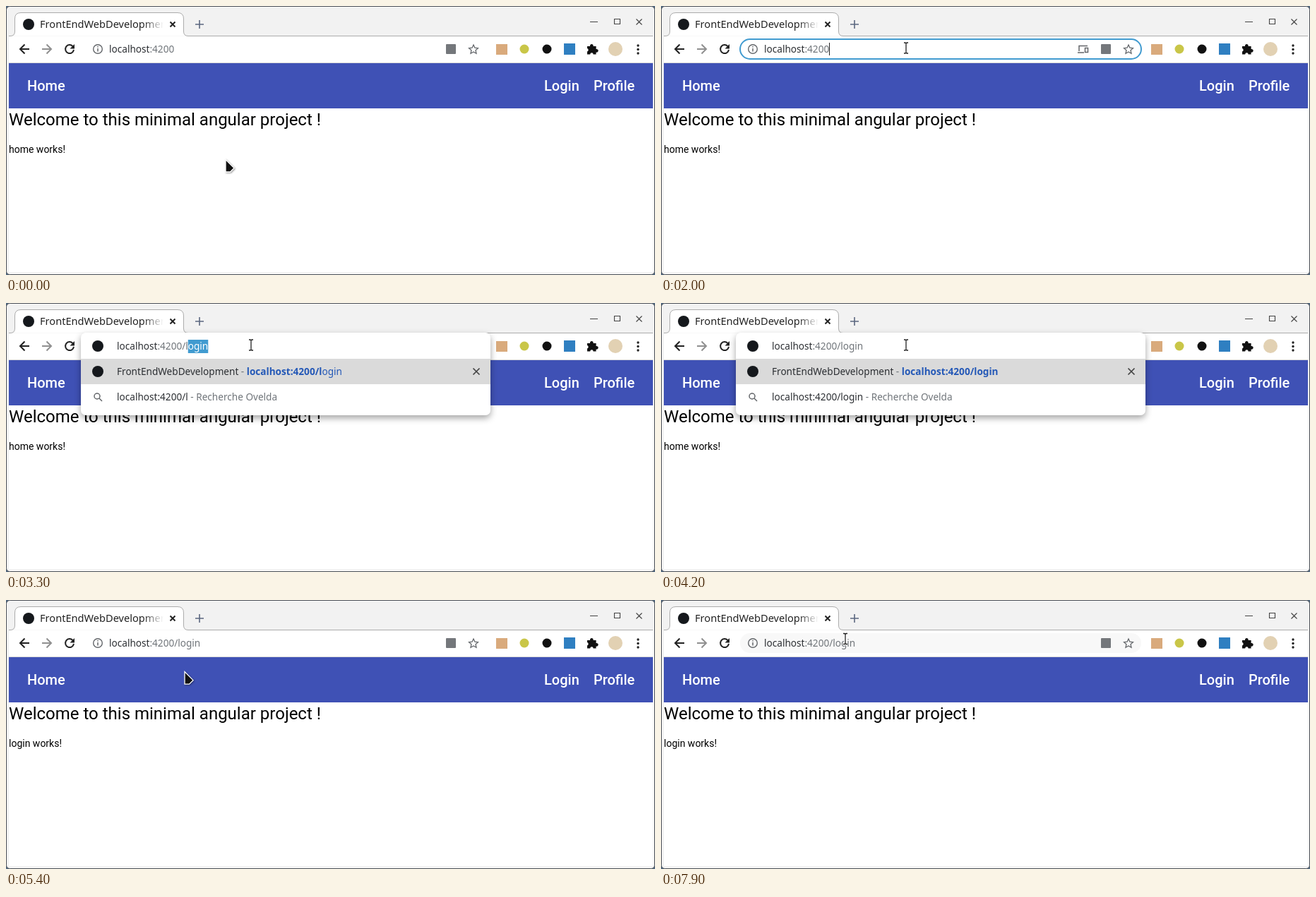
Write an HTML page that moves like this. It is 919 px wide and 381 px high and loops after 8000 ms.

```html
<!DOCTYPE html>
<html lang="en">
<head>
<meta charset="utf-8">
<title>Browser navigation</title>
<style>
  html, body { margin: 0; width: 100%; height: 100%; overflow: hidden; background: #52687f; }
  svg { display: block; width: 919px; height: 381px; }
  text { white-space: pre; }
  .ui { font: 13.6px "Noto Sans", "Open Sans", sans-serif; fill: #2c2f33; }
  .page { font: 14px Roboto, sans-serif; }
  .nav { font: 500 20px Roboto, sans-serif; fill: #fff; }
  .dim { fill: #70757a; }
  .link { fill: #2559b7; }
  .bold { font-weight: 700; }
  .selected { fill: #fff; }
  .line { fill: none; stroke: #222; stroke-width: 2; }
  .gray { stroke: #63666a; stroke-width: 1.5; }
  .panel { filter: drop-shadow(0 4px 5px rgba(0, 0, 0, .36)); }
</style>
</head>
<body>
<svg viewBox="0 0 919 381">
  <defs>
    <linearGradient id="fade" gradientUnits="userSpaceOnUse" x1="194" x2="223" y1="0" y2="0">
      <stop stop-color="#222"/><stop offset="1" stop-color="#222" stop-opacity="0"/>
    </linearGradient>
  </defs>

  <!-- window and tab strip -->
  <rect x=".5" y=".5" width="918" height="380" rx="5" fill="#f2f2f2" stroke="#4b5057"/>
  <path d="M4 43H916V377H4Z" fill="#fff"/>
  <path d="M4 42.5H6Q12.5 42.5 12.5 36V18Q12.5 9.5 21 9.5H243Q251.5 9.5 251.5 18V36Q251.5 42.5 258 42.5H916" fill="#fff" stroke="#acacac"/>
  <path d="M4 80.5H916" stroke="#d8d8d8"/>
  <circle id="favicon" cx="32" cy="26" fill="#15181c"/>
  <path id="spinner" class="line" d="M25 26A7 7 0 0 1 32 19" style="stroke-width:1.6"/>
  <text class="ui" x="48" y="31" style="font-size:14.6px;fill:url(#fade)">FrontEndWebDevelopment</text>
  <path class="line" d="M232.5 22.5l7 7m0-7l-7 7"/>
  <path class="line" d="M268 26h12m-6-6v12" style="stroke:#5b6780;stroke-width:1.6"/>
  <path class="line" d="M827 22.5h11M861.5 18.5h8v7h-8zM892.5 18.5l8 8m0-8l-8 8" style="stroke:#444;stroke-width:1.1"/>

  <!-- toolbar -->
  <path class="line" d="M33 61H20m6.5-6.5L20 61l6.5 6.5"/>
  <path class="line" d="M51 61h13m-6.5-6.5L64 61l-6.5 6.5" style="stroke:#909090"/>
  <g id="reload">
    <path class="line" d="M94.5 57A6 6 0 1 0 96 62"/>
    <path d="M97 54v6.5h-6.5z" fill="#222"/>
  </g>
  <path id="stop" class="line" d="M85 56l10 10m0-10l-10 10"/>
  <rect id="hover" x="112" y="47" width="568" height="28" rx="14" fill="#f8f8f8"/>
  <g id="focus" fill="none">
    <rect x="112" y="47" width="568" height="28" rx="14" fill="#fff" stroke="#419bd0" stroke-width="2"/>
    <path class="line gray" d="M592 64v-7.5h12M590 66h9M600.5 59.5h4v6h-4z"/>
  </g>
  <g class="line gray">
    <circle cx="130" cy="61" r="6.3" stroke-width="1.4"/>
    <path d="M130 60v4.5M130 57v1.6"/>
    <path d="M662 55l1.9 4.2 4.5.5-3.4 3 1 4.5-4-2.3-4 2.3 1-4.5-3.4-3 4.5-.5z" stroke-width="1.3"/>
  </g>
  <rect x="623" y="54" width="14" height="14" rx="1" fill="#74777b"/>
  <rect id="extension" x="694" y="54" width="16" height="15"/>
  <circle cx="734" cy="61" r="6.5" fill="#c9c648"/>
  <circle cx="766" cy="61" r="6.5" fill="#111"/>
  <rect x="790" y="53" width="16" height="16" fill="#2f7fc1"/>
  <path d="M823 57h4a2.4 2.4 0 1 1 4.6 0h4v4a2.4 2.4 0 1 1 0 4.6v2.9h-4a2.2 2.2 0 0 0-4.4 0H823v-4a2.3 2.3 0 0 0 0-4.4z" fill="#111"/>
  <circle cx="863" cy="61" r="10" fill="#e2d1b3"/>
  <g fill="#222"><circle cx="895" cy="56" r="1.7"/><circle cx="895" cy="61.5" r="1.7"/><circle cx="895" cy="67" r="1.7"/></g>
  <rect id="urlMark" x="146" y="52" height="19" fill="#419bd0"/>
  <text id="url" class="ui" x="146" y="66"></text>

  <!-- page -->
  <path d="M4 81H916V145H4Z" fill="#3f51b5"/>
  <g class="nav">
    <text x="30" y="120">Home</text>
    <text x="762" y="120">Login</text>
    <text x="832" y="120">Profile</text>
  </g>
  <text class="page" x="4" y="169" style="font-size:24px">Welcome to this minimal angular project !</text>
  <text id="body" class="page" x="4" y="208"></text>

  <!-- suggestions -->
  <g id="panel">
    <rect id="sheet" class="panel" x="106" y="42" width="580" rx="7" fill="#fff"/>
    <path d="M106 79H686V115H106Z" fill="#dadada"/>
    <path class="line" d="M661.5 92.5l9 9m0-9l-9 9" style="stroke:#444;stroke-width:1.7"/>
    <circle cx="130" cy="61" r="8" fill="#15181c"/>
    <rect id="typedMark" y="52" height="19" fill="#419bd0"/>
    <text id="typed" class="ui" x="157" y="66"></text>
    <g id="rows"></g>
  </g>
  <path id="caret" d="M0 52V70" stroke="#222"/>

  <g id="pointer">
    <path id="arrow" d="M0 0V17.5H6.5L12 12Z" fill="#111" stroke="#fff" stroke-width="1.3" style="filter:drop-shadow(1px 1px 1px #0006)"/>
    <g id="beam" fill="none">
      <path id="beamShape" d="M-3-7.5H-1L0-6.5L1-7.5H3M0-6.5V6.5M-3 7.5H-1L0 6.5L1 7.5H3" stroke="#fff" stroke-width="3.4"/>
      <use href="#beamShape" style="stroke:#222"/>
      <path d="M-3-7.5H-1L0-6.5L1-7.5H3M0-6.5V6.5M-3 7.5H-1L0 6.5L1 7.5H3" stroke="#222" stroke-width="1.3"/>
    </g>
  </g>
</svg>
<script>
const LOOP = 8000, STEP = 100, HOST = "localhost";
const el = id => document.getElementById(id);
const show = (id, on) => el(id).setAttribute("visibility", on ? "inherit" : "hidden");
const set = (id, attrs) => { for (const k in attrs) el(id).setAttribute(k, attrs[k]); };
const span = (cls, text) => `<tspan class="${cls}">${text}</tspan>`;
const within = (t, from, to) => t >= from && t < to;

// time, x, y
const path = [
  [0, 311, 217.5], [300, 311, 217.5], [400, 311, 209], [500, 311, 209], [1000, 347, 59.5],
  [5200, 347, 59.5], [5900, 18, 207], [6100, 26, 204], [6200, 18, 205], [6300, 18, 205],
  [6400, 29, 203], [6500, 8, 200], [6600, 8, 200], [6800, 90, 207], [7100, 229, 191],
  [7200, 229, 191], [7700, 265, 60], [7800, 265, 60], [7900, 261, 55], [LOOP, 261, 55]
];
const typing = [[0, ""], [2600, "/"], [3200, "/l"], [3500, "/lo"], [3600, "/log"], [3700, "/login"]];

function pointerAt(t) {
  const i = path.findIndex(p => p[0] > t);
  const [t0, x0, y0] = path[i - 1], [t1, x1, y1] = path[i];
  const k = (t - t0) / (t1 - t0);
  return [x0 + (x1 - x0) * k, y0 + (y1 - y0) * k];
}

function overText(x, y) {
  return within(y, 46, 77) || (within(y, 145, 178) && x < 446) || (within(y, 193, 214) && x < 84);
}

// Writes an address and marks its characters from selectFrom on.
function address(id, tail, selectFrom) {
  const full = HOST + ":4200" + tail, from = Math.min(selectFrom, full.length);
  const cut = Math.min(HOST.length, from);
  el(id).innerHTML = span("", full.slice(0, cut)) + span("dim", full.slice(cut, from)) +
    span("selected", full.slice(from));
  const left = +el(id).getAttribute("x"), total = el(id).getComputedTextLength();
  const start = from ? el(id).getSubStringLength(0, from) : 0;
  set(id + "Mark", { x: left + start, width: total - start });
  return left + total;
}

function rowsFor(typed) {
  const site = (title, match, rest) =>
    title + span("dim", " - ") + span("link bold", HOST + ":4200" + match) + span("link", rest);
  const search = HOST + ":4200" + typed + span("dim", " - Recherche Ovelda");
  return typed === "/"
    ? [site("FrontEndWebDevelopment", "", ""), search,
       site("FrontEndWebDevelopment", "/", "login"), site("Frontend", "/", "profile")]
    : [site("FrontEndWebDevelopment", typed, "/login".slice(typed.length)), search];
}

function drawPanel(typed) {
  const rows = rowsFor(typed);
  set("sheet", { height: 45 + rows.length * 36 });
  el("rows").innerHTML = rows.map((row, i) => {
    const y = 97 + i * 36;
    const icon = i === 1
      ? `<path class="line gray" d="M132 ${y + 2}l4 4M133 ${y - 1}a4 4 0 1 0-8 0a4 4 0 1 0 8 0"/>`
      : `<circle cx="130" cy="${y}" r="8" fill="#15181c"/>`;
    return `${icon}<text class="ui" x="157" y="${y + 5}">${row}</text>`;
  }).join("");
  const tail = typed.length > 1 ? "/login" : typed;
  return address("typed", tail, HOST.length + 5 + typed.length);
}

function draw(t) {
  const open = within(t, 2600, 4300), loading = within(t, 4300, 4800);
  const focused = within(t, 1200, 2600), selected = within(t, 1200, 2000);
  const [x, y] = pointerAt(t), beam = overText(x, y);

  let caretX = address("url", t < 4300 ? "" : "/login", selected ? 0 : 99);
  if (open) caretX = drawPanel(typing.findLast(k => k[0] <= t)[1]);
  show("panel", open);
  set("caret", { transform: `translate(${Math.round(caretX) + .5})` });
  show("caret", within(t, 2000, 2200) || within(t, 2600, 3200) || within(t, 3700, 4200));

  show("focus", focused);
  show("hover", y < 77 && (t < 1200 || t >= 5300));
  show("reload", !loading);
  show("stop", loading);
  show("spinner", loading);
  set("spinner", { transform: `rotate(${(t - 4400) * .36} 32 26)` });
  set("favicon", { r: loading ? 4.8 : 8 });
  set("extension", { fill: loading ? "#b5b5b5" : "#d9aa7c" });
  el("body").textContent = (t < 4400 ? "home" : "login") + " works!";

  set("pointer", { transform: `translate(${x} ${y})` });
  show("arrow", !beam);
  show("beam", beam);
}

const start = performance.now();
let last = -1;
function tick() {
  const t = Math.floor((performance.now() - start) % LOOP / STEP) * STEP;
  if (t !== last) draw(last = t);
  requestAnimationFrame(tick);
}
tick();
</script>
</body>
</html>
```
